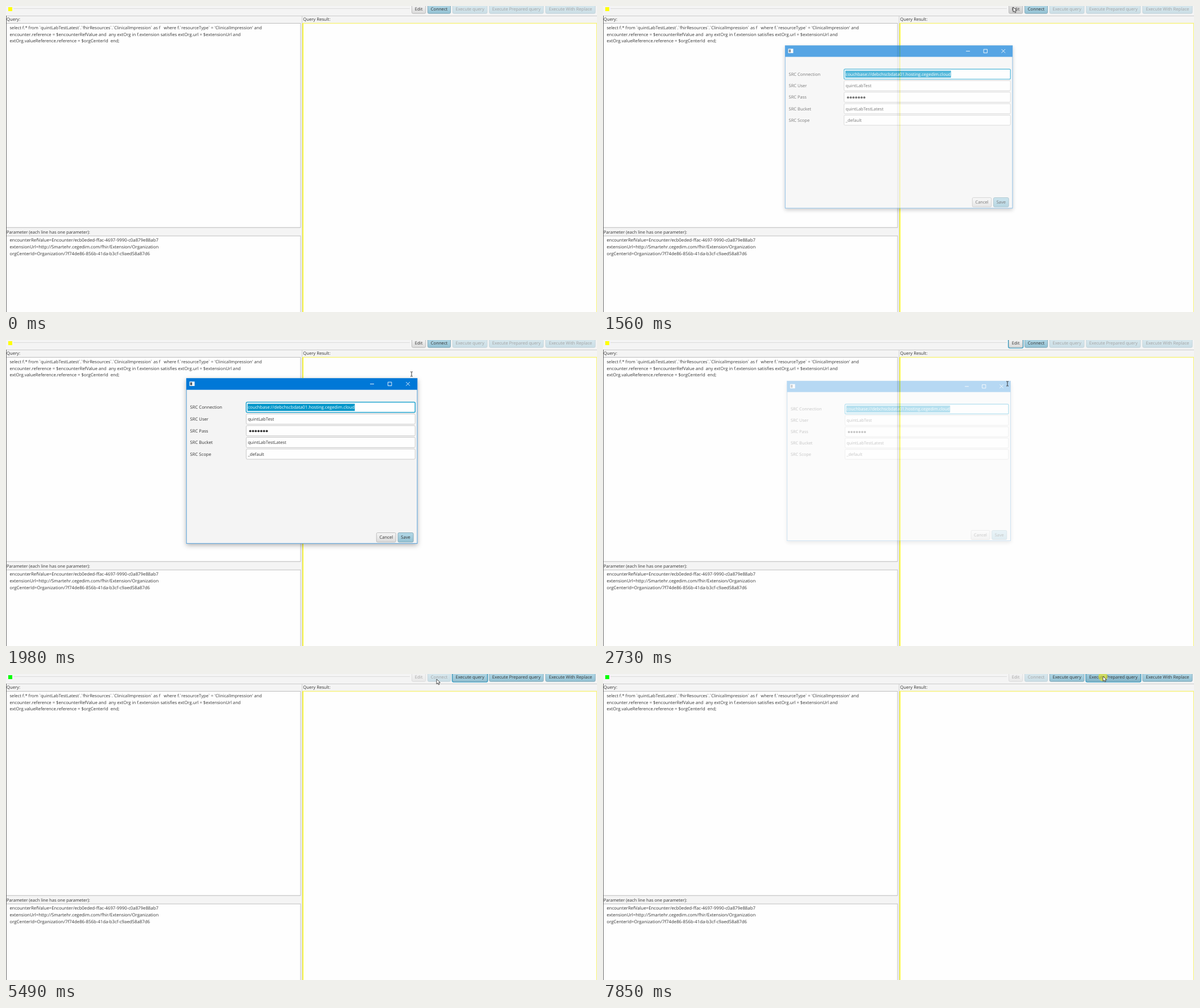
An HTML page for the animation above (8 s loop, 1039 by 539 pixels).

```html
<!DOCTYPE html>
<html lang="en">
<head>
<meta charset="utf-8">
<title>Query tool</title>
<style>
  html, body { margin: 0; width: 100%; height: 100%; overflow: hidden; background: #f4f4f4; }
  svg { display: block; }
  text {
    font: 7.65px "Open Sans", "Noto Sans", sans-serif;
    fill: #353535; white-space: pre; text-rendering: geometricPrecision;
  }
  .tick { font-family: Roboto, sans-serif; }
  .mid { text-anchor: middle; }
</style>
</head>
<body>
<svg id="stage" width="1039" height="539" viewBox="0 0 1039 539">
  <defs>
    <linearGradient id="grey" x2="0" y2="1"><stop stop-color="#f6f6f6"/><stop offset="1" stop-color="#dadada"/></linearGradient>
    <linearGradient id="greyHover" x2="0" y2="1"><stop stop-color="#fbfbfb"/><stop offset="1" stop-color="#e4e4e4"/></linearGradient>
    <linearGradient id="greyArmed" x2="0" y2="1"><stop stop-color="#e4e4e4"/><stop offset="1" stop-color="#cdcdcd"/></linearGradient>
    <linearGradient id="blue" x2="0" y2="1"><stop stop-color="#b4d9e7"/><stop offset="1" stop-color="#93c1d3"/></linearGradient>
    <linearGradient id="blueHover" x2="0" y2="1"><stop stop-color="#c8e5ef"/><stop offset="1" stop-color="#a8d1e0"/></linearGradient>
    <linearGradient id="blueArmed" x2="0" y2="1"><stop stop-color="#a9d3e3"/><stop offset="1" stop-color="#82b4c8"/></linearGradient>
    <filter id="shadow" x="-10%" y="-10%" width="120%" height="120%">
      <feDropShadow dx="0" dy="3" stdDeviation="4" flood-color="#000" flood-opacity=".3"/>
    </filter>
  </defs>
</svg>
<script>
const LOOP = 8000;
const stage = document.getElementById('stage');

function add(parent, name, attrs = {}) {
  const node = document.createElementNS('http://www.w3.org/2000/svg', name);
  for (const key in attrs) node.setAttribute(key, attrs[key]);
  return parent.appendChild(node);
}
const rect = (parent, x, y, width, height, fill, more) =>
  add(parent, 'rect', { x, y, width, height, fill, ...more });
const line = (parent, d, stroke, width = 1) =>
  add(parent, 'path', { d, stroke, 'stroke-width': width, fill: 'none' });

// Backticks get a narrower face than the rest of the text.
function label(parent, x, y, content, more = {}) {
  const node = add(parent, 'text', { x, y, ...more });
  for (const part of content.split(/(`)/)) {
    if (part) add(node, 'tspan', part === '`' ? { class: 'tick' } : {}).textContent = part;
  }
  return node;
}

function button(parent, text, x, y, width, height, tone) {
  const g = add(parent, 'g');
  const ring = rect(g, x - .3, y - .3, width + .6, height + .6, 'none',
    { rx: 2.4, stroke: '#2f9fc9', 'stroke-width': 1.5 });
  const face = rect(g, x + .5, y + .5, width - 1, height - 1, `url(#${tone})`,
    { rx: 2, stroke: tone === 'blue' ? '#80a7b7' : '#b8b8b8', 'stroke-width': .9 });
  label(g, x + width / 2, y + height / 2 + 2.6, text, { class: 'mid' });
  ring.style.display = 'none';
  return { g, ring, face, tone, x, width };
}

// Main window
rect(stage, 0, 0, 1039, 539, '#f4f4f4');
line(stage, 'M13 4.5H710', '#dcdcdc');
line(stage, 'M0 17.5H1039', '#cbcbcb');
const lamp = rect(stage, 4, 2, 7, 7, '#ff0');

const buttons = [
  ['Edit', 713, 25.3, 'grey'],
  ['Connect', 741, 41, 'blue'],
  ['Execute query', 784.8, 61.6, 'blue'],
  ['Execute Prepared query', 849.3, 96, 'blue'],
  ['Execute With Replace', 948.3, 88.2, 'blue']
].map(([text, x, width, tone]) => button(stage, text, x, -2.8, width, 16.5, tone));

function pane(y, height) {
  rect(stage, 0, y, 518, height, '#fefefe');
  line(stage, `M0 ${y + .5}H518`, '#bdbdbd');
  line(stage, `M517.8 ${y}v${height}`, '#c2c2c2');
}
pane(30, 360);
line(stage, 'M0 390.2H518', '#b9b9b9');
pane(404.5, 136);
line(stage, 'M.5 17V539', '#6a6a6a');
line(stage, 'M520.5 18V539', '#d2d2d2');

rect(stage, 522, 30, 516.5, 510, '#fefefe');
line(stage, 'M522 30.5H1038.5V539', '#f6f27c', 1.3);
line(stage, 'M522 30V539', '#fbf740', 2);

label(stage, 1, 26.4, 'Query:');
label(stage, 522.3, 26.4, 'Query Result:');
label(stage, 1, 400.8, 'Parameter (each line has one parameter):', { style: 'font-size:7.6px' });

[
  "select f.* from `quintLabTestLatest`.`fhirResources`.`ClinicalImpression` as f   where f.`resourceType` = 'ClinicalImpression' and",
  'encounter.reference = $encounterRefValue and  any extOrg in f.extension satisfies extOrg.url = $extensionUrl and',
  'extOrg.valueReference.reference = $orgCenterId  end;'
].forEach((text, i) => label(stage, 6.5, 41 + i * 11.7, text, { style: `font-size:${i ? 7.7 : 7.6}px` }));

[
  'encounterRefValue=Encounter/ecb0eded-ffac-4697-9990-c0a879e88ab7',
  'extensionUrl=http://Smartehr.cegedim.com/fhir/Extension/Organization',
  'orgCenterId=Organization/7f74de86-856b-41da-b3cf-c9aed58a87d6'
].forEach((text, i) => label(stage, 6.5, 415.4 + i * 11.7, text, { style: 'font-size:7.8px' }));

// Dialog
const dialog = add(stage, 'g');
rect(dialog, 316.8, 67.3, 406.6, 291.4, '#f4f4f4', { filter: 'url(#shadow)' });
rect(dialog, 317.2, 67.7, 405.8, 290.6, 'none', { stroke: '#3b8fd0', 'stroke-width': .9 });
rect(dialog, 317, 67.5, 406, 20.2, '#0078d7');
rect(dialog, 322.6, 73.2, 9, 7.8, '#f4f8fb');
rect(dialog, 323.8, 74.6, 3.4, 5, '#4a5a66');
const closeBox = rect(dialog, 691.5, 67.8, 31, 19.6, '#e81123');
line(dialog, 'M640 77.5h7M671.5 74.2h6.4v6.4h-6.4zM703.3 74l6.6 6.6M709.9 74l-6.6 6.6', '#fff', .9);

[
  ['SRC Connection', 'couchbase://debchscbdata01.hosting.cegedim.cloud'],
  ['SRC User', 'quintLabTest'],
  ['SRC Pass', ''],
  ['SRC Bucket', 'quintLabTestLatest'],
  ['SRC Scope', '_default']
].forEach(([name, value], i) => {
  const mid = 118.6 + i * 20.6;
  label(dialog, 323.6, mid + 2.7, name);
  rect(dialog, 422.3, mid - 9, 297, 18, '#fefefe', i
    ? { rx: 2, stroke: '#c4c4c4', 'stroke-width': .9 }
    : { rx: 2, stroke: '#1fa3cf', 'stroke-width': 1.5 });
  if (!i) rect(dialog, 424.6, mid - 6.3, 188.6, 12.6, '#0096c9');
  if (value) label(dialog, 425.2, mid + 2.8, value, { style: i ? '' : 'fill:#fff;font-size:7.7px' });
  else for (let k = 0; k < 7; k++) {
    add(dialog, 'circle', { cx: 429.4 + k * 4.85, cy: mid + .6, r: 1.9, fill: '#333' });
  }
});
button(dialog, 'Cancel', 650.8, 339, 35, 17.6, 'grey');
button(dialog, 'Save', 688.6, 339, 28, 17.6, 'blue');

// Pointer
const pointer = add(stage, 'g');
const halo = add(pointer, 'circle', { cy: .8, r: 8, fill: '#eae61c', 'fill-opacity': .62 });
const arrow = add(pointer, 'path', {
  d: 'M0 0V8.6L2 6.8L3.4 9.9L4.9 9.2L3.6 6.2H6.3Z',
  fill: '#fff', stroke: '#222', 'stroke-width': .8, 'stroke-linejoin': 'round'
});
const beam = line(pointer, 'M-2 -4H-.5L0 -3.5L.5 -4H2M0 -3.5V3.5M-2 4H-.5L0 3.5L.5 4H2', '#222', .9);

const smooth = u => u * u * (3 - 2 * u);
const easeIn = u => Math.pow(u, 1.4);
const easeOut = u => 1 - (1 - u) * (1 - u);

// start, end, from, to, easing
const moves = [
  [260, 760, [866, 256], [720, 1], smooth],
  [900, 960, [720, 1], [721, 2], smooth],
  [1560, 1980, [721, 2], [713, 60], smooth],
  [1980, 2120, [713, 60], [711, 77], easeOut],
  [2870, 3430, [711, 77], [757, 9], smooth],
  [6080, 6430, [757, 9], [828, 4], easeIn],
  [6430, 6850, [828, 4], [879, 4], easeOut]
];
const clicks = [[1160, 1360], [2460, 2730], [3630, 3900], [7800, LOOP]];
// time, index of the focused button
const focusSteps = [[0, -1], [1160, 0], [1490, -1], [2730, 0], [3630, 1], [5490, 2], [7800, 3]];
// time, index of the button held down
const armedSteps = [[0, -1], [1160, 0], [1980, -1], [3630, 1], [5490, -1], [7800, 3]];
// time, opacity, scale
const dialogSteps = [
  [0, 0, 1], [1490, .25, .968], [1560, .66, .985], [1630, .92, .996],
  [1700, 1, 1], [2730, .28, .968], [2800, 0, 1]
];

const latest = (table, t) => table.filter(row => row[0] <= t).pop();
const show = (node, on) => { node.style.display = on ? '' : 'none'; };

// The pointer is sampled about every 70 ms.
function pointerAt(t) {
  const [start, end, from, to, ease] = latest(moves, t) || moves[0];
  const n = Math.max(1, Math.round((end - start) / 70));
  const step = Math.floor((t - start) / (end - start) * n + 1e-6);
  const u = ease(Math.min(1, Math.max(0, step / n)));
  return from.map((v, i) => v + (to[i] - v) * u);
}

function draw(t) {
  const [x, y] = pointerAt(t);
  const pressed = clicks.some(([from, to]) => t >= from && t < to);
  const connected = t >= 5490;
  const focus = latest(focusSteps, t)[1];
  const armed = latest(armedSteps, t)[1];

  lamp.setAttribute('fill', connected ? '#0f0' : '#ff0');
  buttons.forEach((b, i) => {
    const enabled = connected ? i > 1 : i < 2;
    const hover = t >= 260 && enabled && y < 14 && x >= b.x && x <= b.x + b.width;
    const state = !hover ? '' : armed === i ? 'Armed' : 'Hover';
    b.g.setAttribute('opacity', enabled ? 1 : .42);
    b.face.setAttribute('fill', `url(#${b.tone}${state})`);
    show(b.ring, focus === i);
  });

  const [, opacity, scale] = latest(dialogSteps, t);
  show(dialog, opacity > 0);
  dialog.setAttribute('opacity', opacity);
  dialog.setAttribute('transform', `translate(520 213) scale(${scale}) translate(-520 -213)`);
  const hot = t >= 2120 && t < 2730 ? Math.min(1, (Math.floor((t - 2120) / 70) + 1) / 3) : 0;
  closeBox.setAttribute('opacity', hot);
  closeBox.setAttribute('fill', pressed ? '#f1707a' : '#e81123');

  const overDialog = opacity === 1 && y > 67;
  const typing = y > 30 && !overDialog;
  show(pointer, t >= 260);
  show(halo, pressed);
  show(arrow, !typing);
  show(beam, typing);
  pointer.setAttribute('transform', `translate(${x} ${y})`);
}

const began = performance.now();
function tick() {
  draw((performance.now() - began) % LOOP);
  requestAnimationFrame(tick);
}
tick();
</script>
</body>
</html>
```
